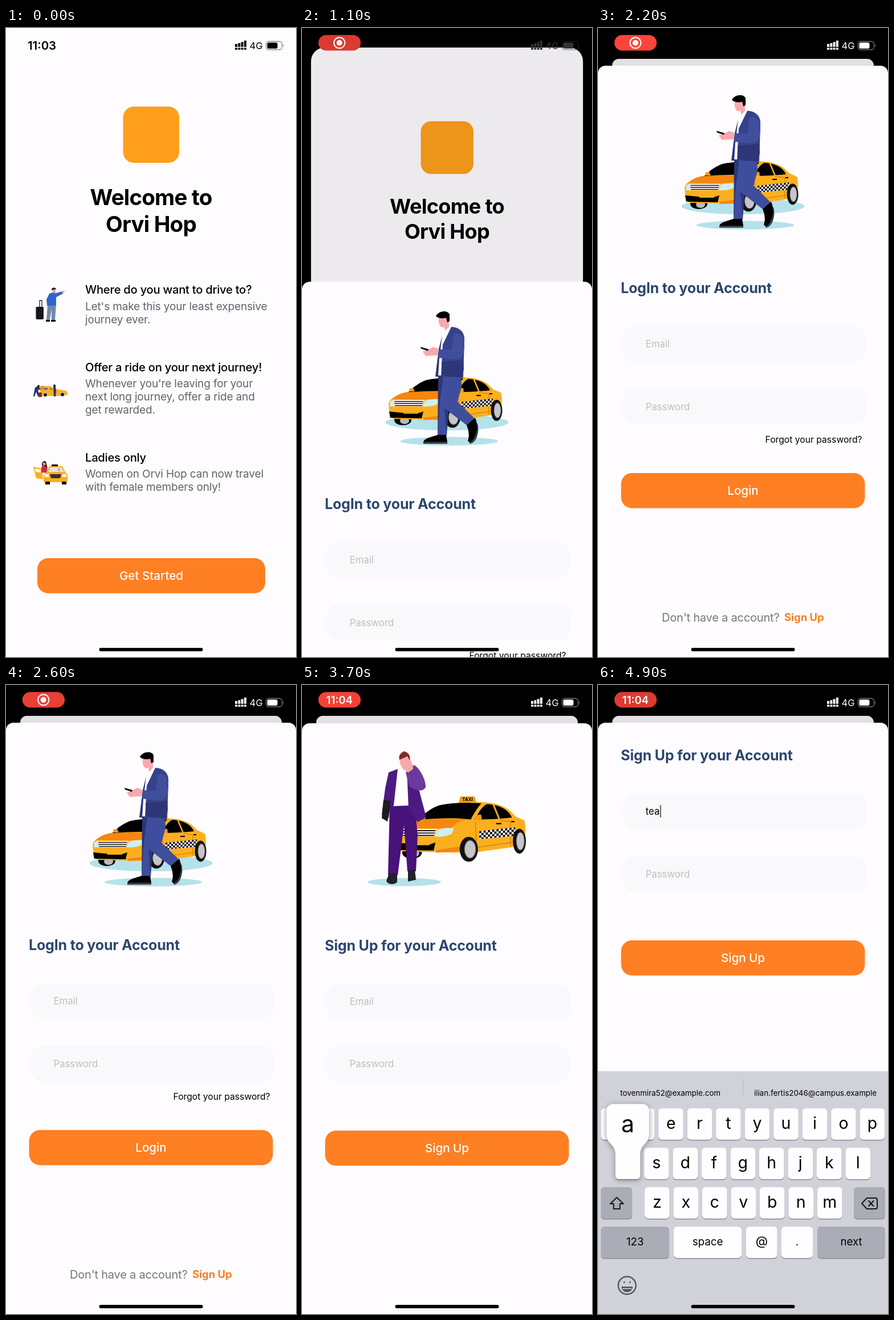
These frames come from a looping animation (509 by 1101 pixels, 5000 ms). An HTML page:

```html
<!DOCTYPE html>
<html lang="en">
<head>
<meta charset="utf-8">
<title>Ride sharing onboarding</title>
<style>
html, body { margin: 0; width: 100%; height: 100%; overflow: hidden; background: #000; }
#stage { position: relative; width: 509px; height: 1101px; overflow: hidden; background: #000; }
#stage > * { position: absolute; left: 0; top: 0; }
svg { display: block; }
.card { width: 509px; overflow: hidden; background: #fefcff; transform-origin: 50% 0; }
#home { height: 1101px; }
#stage > .sheet { top: 66px; height: 1035px; }
.dim { position: absolute; inset: 0; background: #000; opacity: 0; }
text { font-family: Inter, "Liberation Sans", sans-serif; font-optical-sizing: none; white-space: pre; }
.mid { text-anchor: middle; }
.hero { font-size: 38.5px; font-weight: 700; letter-spacing: -.8px; }
.title { font-size: 20.2px; font-weight: 500; letter-spacing: -.26px; }
.body { font-size: 19px; letter-spacing: -.15px; fill: #636267; }
.btn { font-size: 20.6px; font-weight: 500; fill: #fff; }
.head { font-size: 25px; font-weight: 700; letter-spacing: -.18px; fill: #2b476e; }
.field { font-size: 16.8px; }
.hint { fill: #bfbec2; }
.link { font-size: 15.7px; }
.ask { font-size: 20px; letter-spacing: -.2px; fill: #77767b; }
.join { font-size: 18.4px; font-weight: 700; fill: #fb7e1e; }
.clock { font-size: 18.6px; font-weight: 600; }
#before { font-size: 20.4px; }
.mail { font-size: 13.4px; }
</style>
</head>
<body>
<div id="stage">

<svg width="0" height="0">
  <defs>
    <pattern id="check" width="6.6" height="6.6" patternUnits="userSpaceOnUse" patternTransform="translate(280 276) skewY(-6)">
      <rect width="6.6" height="6.6" fill="#fff"/>
      <path d="M0 0h3.3v3.3H0zM3.3 3.3h3.3v3.3H3.3z"/>
    </pattern>
    <g id="car">
      <ellipse cx="177" cy="308" rx="15" ry="9"/>
      <ellipse cx="180" cy="309" rx="8" ry="6" fill="#b9b9be"/>
      <path fill="#fcaf1e" d="M152 281C153 274 156 271 162 268L190 257 207 244C222 234 270 231 295 234 318 237 328 245 335 254L349 260C352 268 351 285 348 292L330 300 278 307 240 308 162 306 154 303Z"/>
      <path fill="#f5860f" d="M158 271C168 262 180 259 192 258H262C250 261 242 265 238 271 215 273 180 272 158 271Z"/>
      <path d="M187 259C195 250 207 242 218 238 240 233 270 234 283 235 277 242 271 251 267 259 245 256 220 257 187 259Z"/>
      <path d="M274 259C278 248 286 238 292 236 310 237 324 243 330 256 312 258 290 259 274 259Z"/>
      <path fill="none" stroke="#fcaf1e" stroke-width="2.5" d="M301 235 311 259"/>
      <path fill="none" stroke="#c9790f" d="M274 262 276 303M311 260 328 262V298M278 300 330 293"/>
      <path d="M306 264h8v2h-8zM329 261h5v2h-5z"/>
      <path fill="url(#check)" d="M280 276 335 270V283L280 288Z"/>
      <path fill="#f79a17" d="M189 258 188 253 195 252 198 258ZM271 260C272 254 276 251 283 252L284 259Z"/>
      <path fill="#fff" d="M160 273H215L211 284H162Z"/>
      <path fill="none" stroke="#111" stroke-width="1.6" d="M162 275.5H213M162 279H212M163 282.5H211"/>
      <path fill="#cfeef5" d="M212 284 216 274C225 271 235 271 241 272L238 280C230 284 220 285 212 284ZM155 275 160 273 162 284H154Z"/>
      <path d="M153 293 174 295H207L213 293 210 305 155 304Z"/>
      <path fill="#fcaf1e" d="M176 295H206L203 297H179Z"/>
      <path fill="#f5860f" d="M214 304 252 299V306L214 308Z"/>
      <g fill="#111">
        <ellipse cx="264" cy="303" rx="14" ry="18.5"/><ellipse cx="341.500" cy="291" rx="10" ry="18.500"/>
      </g>
      <g fill="#c6c5ca" stroke="#77777c">
        <ellipse cx="266" cy="303" rx="8.500" ry="13"/><ellipse cx="343" cy="291" rx="6" ry="13"/>
      </g>
    </g>
    <g id="fields">
      <g fill="#f9f8fb"><rect x="44" y="522.5" width="426" height="61" rx="18"/><rect x="44" y="632" width="426" height="61" rx="18"/></g>
      <text class="field hint" x="83.5" y="668.5">Password</text>
      <rect x="40.5" y="779" width="428" height="61.5" rx="19" fill="#ff7f23"/>
    </g>
  </defs>
</svg>

<div id="home" class="card">
  <svg width="509" height="1101">
    <rect x="205.5" y="137.5" width="98.5" height="98.5" rx="19" fill="#ff9f1c"/>
    <text class="hero mid" x="254.5" y="310">Welcome to</text>
    <text class="hero mid" x="254.5" y="357">Orvi Hop</text>

    <g>
      <path fill="none" stroke="#222" stroke-width="1.3" d="M59 489V477H63V489"/>
      <rect x="52.5" y="488" width="13.5" height="22" rx="2" fill="#16161a"/>
      <path fill="#7387ad" d="M73 484H88L86 511H80L80 492 77 511H71Z"/>
      <path d="M70 511h7v3h-7zM79 511h8v3h-8z"/>
      <path fill="#2f66cd" d="M76 465 82 463 88 464 98 461 100 465 90 470 88 472V486H72L71 475Z"/>
      <path fill="#f2a08f" d="M81 457H87V463H82ZM98 461 103 459 102 463 99 465Z"/>
      <path fill="#1b1b24" d="M80 459C79 454 87 453 88 457L83 458Z"/>
    </g>

    <g>
      <path fill="#fcaf1e" d="M60 635 64 627H78L88 632 106 635 109 642 100 644H60Z"/>
      <path fill="#667" d="M67 630H73V633H66ZM77 630 82 633H77Z"/>
      <path fill="#f08a15" d="M60 627 67 626 65 634H60Z"/>
      <g stroke="#c6c5ca" stroke-width="1.5"><circle cx="69" cy="642" r="3.5"/><circle cx="99" cy="641.5" r="3.5"/></g>
      <path fill="#24346f" d="M51 629 57 627 61 632 56 634 59 645H56L53 637 50 645H48ZM83 628 87 627 88 635 87 645H84Z"/>
      <circle cx="57" cy="627" r="2"/><circle cx="85" cy="626" r="2"/>
      <rect x="57" y="638" width="6" height="8" rx="1" fill="#7c2d3c"/>
    </g>

    <g>
      <path fill="#fcaf1e" d="M48 768 63 771 65 790 53 788Z"/>
      <path fill="#fff" d="M51 771 61 773V778L52 777Z"/>
      <path fill="#cd2f3b" d="M62 769 66 764 72 769 73 779 62 778Z"/>
      <path fill="#2a1620" d="M63 766C62 757 71 755 71 763L73 771 68 766Z"/>
      <circle cx="67" cy="763" r="2.5" fill="#f2a08f"/>
      <path fill="#fcaf1e" d="M70 779 76 767H99L104 778C109 779 109 785 107 795H66V783Z"/>
      <path fill="#d6e9f0" d="M74 777 78 769H97L102 777Z"/>
      <path d="M80 764h11v3H80zM69 794h8v5h-8zM98 794h8v5h-8z"/>
      <path fill="#333" d="M77 781H97L95 788H79Z"/>
      <path fill="#fff" d="M68 781h7v5h-7zM99 781h7v5h-7z"/>
      <circle cx="93" cy="773" r="2.5" fill="#f2a08f"/>
    </g>

    <text class="title" x="139" y="465">Where do you want to drive to?</text>
    <text class="body" x="139" y="493.5">Let's make this your least expensive</text>
    <text class="body" x="139" y="516.5">journey ever.</text>
    <text class="title" x="139" y="601">Offer a ride on your next journey!</text>
    <text class="body" x="139" y="628.5">Whenever you're leaving for your</text>
    <text class="body" x="139" y="652">next long journey, offer a ride and</text>
    <text class="body" x="139" y="675">get rewarded.</text>
    <text class="title" x="139" y="758.5">Ladies only</text>
    <text class="body" x="139" y="787">Women on Orvi Hop can now travel</text>
    <text class="body" x="139" y="810">with female members only!</text>
    <g id="start">
      <rect x="55" y="928" width="400" height="61.5" rx="19" fill="#ff7f23"/>
      <text class="btn mid" x="255" y="966">Get Started</text>
    </g>
  </svg>
  <div class="dim"></div>
</div>

<div id="login" class="card sheet">
  <svg width="509" height="1035" viewBox="0 66 509 1035">
    <g class="scroll">
      <g fill="#b5e1ea"><ellipse cx="254.5" cy="312" rx="108" ry="14"/><ellipse cx="258.5" cy="345" rx="86" ry="7.5"/></g>
      <use href="#car"/>
      <path fill="#2d3677" d="M239 230H264L258 280 254 335H238Z"/>
      <path fill="#3f4d9d" d="M248 230H279L280 250 273 276 306 308 293 320 250 287 254 335H238L242 275Z"/>
      <path d="M213 347C214 340 226 338 238 334H253L255 346V349H213ZM289 317 304 304 309 320C309 336 303 347 295 349L291 344C294 336 293 327 289 317Z"/>
      <path fill="#3a3a44" d="M213 346H255V349.5H213ZM308 313 309.5 325C308 340 303 348 295 349.5L294 347C303 343 307 332 308 313Z"/>
      <path fill="#fff" d="M244 160 259 144 263 152 246 225H239Z"/>
      <path fill="#37428c" d="M262 145C276 145 285 154 285 166L283 234 244 232 247 176Z"/>
      <path fill="#2d3677" d="M246 160 240 184 234 232H239L241 200ZM245 206 283 203 284 218 281 234 245 230Z"/>
      <path fill="#414e9c" d="M266 158C279 152 285 165 285 176 285 191 281 202 269 202L239 199 240 184 263 185Z"/>
      <path fill="#f9a9ad" d="M239 183 230 180 223 184 212 188 217 196 231 195 239 195ZM240 130 251 126 258 132 258 145 251 152 250 145C243 148 239 141 240 130Z"/>
      <path d="M208 180 222 184 221 187 209 183ZM235 126C239 117 255 114 259 123V135L255 137 253 129C246 131 239 130 235 126Z"/>
    </g>
    <g class="scroll">
      <text class="head" x="40" y="464">LogIn to your Account</text>
      <use href="#fields"/>
      <text class="field hint" x="83.5" y="559">Email</text>
      <text class="link" x="293.5" y="725.5">Forgot your password?</text>
      <text class="btn mid" x="254.5" y="817">Login</text>
      <text class="ask" x="112" y="1038.5">Don't have a account?</text>
      <text id="join" class="join" x="327" y="1038">Sign Up</text>
    </g>
  </svg>
  <div class="dim"></div>
</div>

<div id="signup" class="card sheet">
  <svg width="509" height="1035" viewBox="0 66 509 1035">
    <g class="scroll">
      <g transform="translate(0 -208)">
        <ellipse cx="179.5" cy="552" rx="64.5" ry="7" fill="#b5e1ea"/>
        <path fill="#e9a01d" d="M278 402H303L306 413H275Z"/>
        <text class="mid" x="290.5" y="410.5" font-size="8" font-weight="700">TAXI</text>
        <use href="#car" transform="translate(-9.5 137) scale(1.145 1.18)"/>
        <path fill="#47127a" d="M154 418H198L203 470 200 533H185L179 452 168 540H151Z"/>
        <path fill="#222128" d="M149 547 153 537 167 536 167 552C163 557 151 557 148 550ZM186 532 198 530 200 548 186 551Z"/>
        <path fill="#fff" d="M164 357 180 350 188 356 187 418 160 419Z"/>
        <path fill="#4c1a80" d="M168 354 152 360 146 388 140 434 152 440 155 420 161 418ZM184 353C194 353 200 364 202 378L218 438 203 447 187 424Z"/>
        <path fill="#6b3a9c" d="M188 354 197 347C208 354 218 375 217 386 211 396 197 391 188 384L182 360 189 357 200 374Z"/>
        <path fill="#1d1b22" d="M143 408 156 410 150 446 140 440Z"/>
        <path fill="#f9a9ad" d="M171 334 188 333 194 346 195 354 187 360 178 355 172 345Z"/>
        <path fill="#7d2d22" d="M171 338C169 329 174 326 179 323 187 325 191 331 189 339L185 332Z"/>
      </g>
      <text class="head" x="40" y="464">Sign Up for your Account</text>
      <use href="#fields"/>
      <text id="mail" class="field hint" x="83.5" y="559">Email</text>
      <rect id="caret" y="542" width="2" height="22" rx="1" fill="#5c5b61"/>
      <text class="btn mid" x="254.5" y="817">Sign Up</text>
    </g>
  </svg>
</div>

<svg width="509" height="1101">
  <g id="board">
    <rect y="676" width="509" height="430" fill="#d1d2d9"/>
    <path stroke="#bbbcc3" d="M254.5 688V719"/>
    <text class="mail mid" x="127" y="719">tovenmira52@example.com</text>
    <text class="mail mid" x="381.5" y="719">ilian.fertis2046@campus.example</text>
    <g id="keys"></g>
    <g fill="none" stroke="#17171a" stroke-width="2" stroke-linejoin="round" stroke-linecap="round">
      <path d="M33 897 44.5 908H38.5V917H27.5V908H21.5Z"/>
      <path d="M472 898H487Q490 898 490 901V914Q490 917 487 917H472L463 907.5ZM475 903 483.5 912M483.5 903 475 912"/>
    </g>
    <g fill="none" stroke="#55565c" stroke-width="2.4">
      <circle cx="51" cy="1051" r="15.5"/>
      <path fill="#55565c" stroke="none" d="M41 1053H61C60 1066 42 1066 41 1053Z"/>
      <path stroke="#d1d2d9" stroke-width="1.6" d="M43 1056.5H59"/>
      <path stroke-linecap="round" d="M46 1045V1046M56 1045V1046"/>
    </g>
    <g id="pop">
      <path fill="#fefefe" stroke="#b9bac0" stroke-width=".8" style="filter:drop-shadow(0 2px 5px #0005)" d="M-38-65a12 12 0 0 1 12-12H26a12 12 0 0 1 12 12V-26C38-5 22-8 22 12V49a6 6 0 0 1-6 6H-16a6 6 0 0 1-6-6V12C-22-8-38-5-38-26Z"/>
      <text id="popText" class="mid" y="-27" font-size="41"></text>
    </g>
  </g>

  <rect id="pill" x="28.8" y="12.2" width="74.2" height="27.3" rx="13.6"/>
  <g id="rec"><circle cx="65.7" cy="26" r="9.6" fill="none" stroke="#fff" stroke-width="2"/><circle cx="65.7" cy="26" r="5" fill="#fff"/></g>
  <text id="before" class="clock mid" x="63" y="37.7">11:03</text>
  <text id="after" class="clock mid" x="65.7" y="32.7" fill="#fff">11:04</text>
  <g id="status">
    <path d="M402 28h4v5h-4zM407.3 26.5h4v6.5h-4zM412.6 24.5h4v8.5h-4zM417.9 22h4v11h-4zM402 34.5h4v3.5h-4zM407.3 34.5h4v3.5h-4zM412.6 34.5h4v3.5h-4zM417.9 34.5h4v3.5h-4z"/>
    <text x="427.5" y="36.5" font-size="16.5">4G</text>
    <rect x="456.5" y="23.5" width="28" height="14.5" rx="4.5" fill="none" stroke="currentColor" stroke-opacity=".45" stroke-width="1.3"/>
    <rect x="458.5" y="25.5" width="18" height="10.5" rx="2.8"/>
    <path fill-opacity=".5" d="M486 28.5Q488.5 30.7 486 33Z"/>
  </g>
  <rect x="163.5" y="1085" width="182" height="6" rx="3"/>
</svg>
</div>

<script>
const $ = id => document.getElementById(id);
const NS = 'http://www.w3.org/2000/svg';
const PITCH = 50.5;
const spots = {};

function add(tag, attrs, text) {
  const el = document.createElementNS(NS, tag);
  for (const k in attrs) el.setAttribute(k, attrs[k]);
  if (text) el.textContent = text;
  $('keys').append(el);
}

function key(x, y, w, label, size = 18.7, dark = false) {
  add('rect', { x, y: y + 1.4, width: w, height: 55, rx: 6, fill: '#8b8c92' });
  add('rect', { x, y, width: w, height: 55, rx: 6, fill: dark ? '#aaacb6' : '#fefdff' });
  const drop = size > 25 ? 36 : 33;
  if (label) add('text', { x: x + w / 2, y: y + drop, class: 'mid', 'font-size': size }, label);
}

[['qwertyuiop', 5.2, 741], ['asdfghjkl', 30.5, 810], ['zxcvbnm', 82, 879]].forEach(([row, x0, y]) => {
  [...row].forEach((ch, i) => {
    const x = x0 + i * PITCH;
    key(x, y, 43.5, ch, 28.5);
    spots[ch] = [x + 21.75, y];
  });
});
key(5, 879, 55, '', 0, true);
key(449, 879, 55, '', 0, true);
key(5, 948, 120, '123', 18.7, true);
key(133, 948, 119, 'space');
key(260, 948, 54.5, '@', 22);
key(322, 948, 55, '.');
key(385, 948, 119, 'next', 18.7, true);

// [time, typed text, pressed key]
const typing = [[0, '', ''], [4400, 't', 't'], [4600, 't', ''], [4700, 'te', 'e'], [4900, 'tea', 'a']];

const clamp = v => Math.max(0, Math.min(1, v));
const mix = (a, b, p) => a + (b - a) * p;
const spring = (t, start) => {
  const x = Math.max(0, t - start) * 0.01585;
  return 1 - (1 + x) * Math.exp(-x);
};
const within = (t, a, b) => t >= a && t < b;
const shift = (el, y) => el.setAttribute('transform', `translate(0 ${y})`);

function place(card, y, scale, radius, dim) {
  card.style.transform = `translateY(${y}px) scale(${scale})`;
  card.style.borderRadius = radius;
  const shade = card.querySelector('.dim');
  if (shade) shade.style.opacity = dim;
}

function draw(t) {
  const p1 = spring(t, 964), p2 = spring(t, 3111.6);
  const foot = moving => moving ? '13px 13px 50px 50px' : '13px 13px 0 0';

  place($('home'), 54 * p1 + 12 * p2, 1 - 0.098 * p1, p1 ? mix(47, 13, p1) + 'px' : '0', 0.11 * p1);
  place($('login'), 1035 * (1 - p1) - 12 * p2, 1 - 0.098 * p2, foot(t < 1900), 0.11 * p2);
  place($('signup'), 1035 * (1 - p2), 1, foot(t < 3700), 0);
  $('start').style.opacity = within(t, 600, 800) ? 0.5 : 1;
  $('join').style.opacity = within(t, 2800, 3000) ? 0.4 : 1;

  const lift = -332 * spring(t, 3911);
  document.querySelectorAll('.scroll').forEach(el => shift(el, lift));
  shift($('board'), 430 * (1 - spring(t, 3900)));

  const [, typed, pressed] = typing.filter(s => s[0] <= t).pop();
  const mail = $('mail');
  mail.textContent = typed || 'Email';
  mail.setAttribute('class', typed ? 'field' : 'field hint');
  $('caret').setAttribute('x', typed ? 84 + mail.getComputedTextLength() : 83.5);
  $('caret').style.opacity = t >= 3900 ? 1 : 0;
  $('pop').style.display = pressed ? '' : 'none';
  if (pressed) {
    $('pop').setAttribute('transform', `translate(${spots[pressed]})`);
    $('popText').textContent = pressed;
  }

  const glow = 0.925 - 0.075 * Math.cos((t - 1050) / 1000 * Math.PI);
  const shown = clamp(t / 300), swap = clamp((t - 3200) / 200);
  $('pill').setAttribute('fill', `rgb(${[255, 69, 58].map(c => Math.round(c * glow))})`);
  $('pill').style.opacity = shown;
  $('rec').style.opacity = shown * (1 - swap);
  $('before').style.opacity = 1 - shown;
  $('after').style.opacity = swap;
  const ink = Math.round(255 * clamp((t - 1050) / 250));
  $('status').style.color = $('status').style.fill = `rgb(${ink},${ink},${ink})`;
}

const begin = performance.now();
function tick() {
  const t = (performance.now() - begin) % 5000;
  draw(Math.floor(t / 100) * 100);
  requestAnimationFrame(tick);
}
tick();
</script>
</body>
</html>
```
